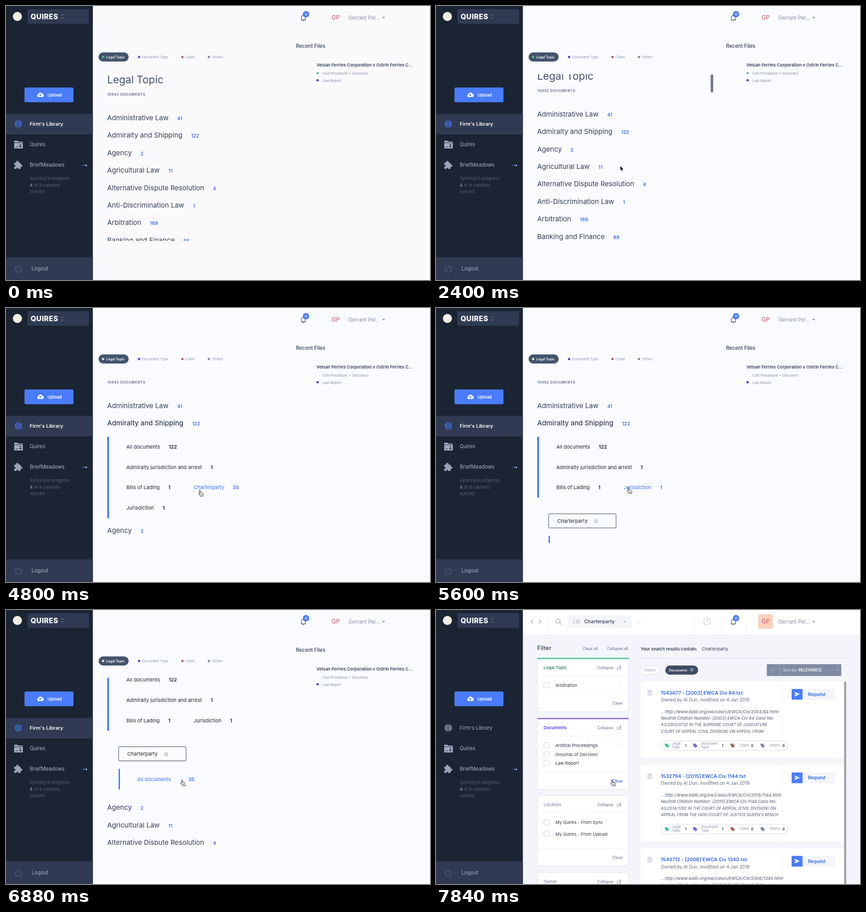
An HTML page for the animation above (8000 ms loop, 930x602 px).

```html
<!DOCTYPE html>
<html lang="en">
<head>
<meta charset="utf-8">
<title>Document library</title>
<style>
html, body { margin: 0; height: 100%; overflow: hidden; }
svg { display: block; width: 930px; height: 602px; font-family: Inter, sans-serif; white-space: pre; }
</style>
</head>
<body>
<svg id="stage" viewBox="0 0 930 602"></svg>
<script>
const LOOP = 8000, STEP = 160;
const BLUE = '#4a7cfb', LINK = '#3f70f5', NAVY = '#303a52', INK = '#333f55', GREY = '#868ea7',
  GREEN = '#45c48f', VIOLET = '#5340e0', RED = '#b0645f', SLATE = '#7f89a3', PAGE = '#f3f5fa';

const text = (x, y, s, size, fill, weight = 400, extra = '') =>
  `<text x="${x}" y="${y}" font-size="${size}" fill="${fill}" font-weight="${weight}" ${extra}>${s}</text>`;
const rect = (x, y, w, h, fill, r = 0, extra = '') =>
  `<rect x="${x}" y="${y}" width="${w}" height="${h}" fill="${fill}" rx="${r}" ${extra}/>`;
const dot = (x, y, r, fill) => `<circle cx="${x}" cy="${y}" r="${r}" fill="${fill}"/>`;
const path = (d, fill) => `<path d="${d}" fill="${fill}"/>`;
const stroke = (d, color, w = 1) => `<path d="${d}" fill="none" stroke="${color}" stroke-width="${w}"/>`;
const count = (n, size, fill, dx = 19) =>
  `<tspan dx="${dx}" font-size="${size}" font-weight="600" fill="${fill}">${n}</tspan>`;

// Value of a keyed track [time, ...values] at time t
function track(keys, t) {
  const i = keys.findIndex(k => k[0] > t);
  if (i === 0) return keys[0].slice(1);
  if (i < 0) return keys[keys.length - 1].slice(1);
  const a = keys[i - 1], b = keys[i];
  let p = (t - a[0]) / (b[0] - a[0]);
  p = p * p * (3 - 2 * p);
  return a.slice(1).map((v, j) => v + (b[j + 1] - v) * p);
}

const POINTER = [[960, 470, 430], [1440, 404, 351], [2720, 404, 351], [3360, 365, 258],
  [4480, 365, 258], [4800, 425, 400], [5280, 422, 394], [6400, 422, 394], [6880, 386, 373]];
const SCROLL = [[2240, 0], [2720, 31.3], [5920, 31.3], [6240, 183]];

function sidebar(results) {
  const tone = results ? '#9aa3b9' : '#3f70e8';
  let s = rect(0, 0, 190.5, 602, '#1b2433') + dot(25, 23, 10, '#f1eee2') + rect(47, 7, 135, 32, NAVY, 2)
    + text(54, 28.5, 'QUIRES', 15.5, '#fff', 800, 'letter-spacing=".5"')
    + stroke('M121 21l2.5-2.5 2.5 2.5M121 25l2.5 2.5 2.5-2.5', '#8790a6')
    + rect(40.5, 179, 107.5, 32.5, BLUE, 3)
    + path('M71.5 200a3.3 3.3 0 0 1-.3-6.5a4.3 4.3 0 0 1 8.2-.8a3.6 3.6 0 0 1-.4 7.300z', '#fff')
    + path('M75 193l-2.7 3h1.7v2.2h2v-2.2h1.7z', BLUE)
    + text(91, 198.5, 'Upload', 9.2, '#fff', 600);
  if (!results) s += rect(0, 237, 190.5, 45, NAVY);
  s += dot(27, 259, 8, tone)
    + stroke('M19 259h16M20.5 255h13M20.5 263h13M27 251v16M27 251q-8 8 0 16M27 251q8 8 0 16', results ? '#1b2433' : NAVY, .9)
    + text(52, 262.5, 'Firm\'s Library', 11, results ? '#aab2c6' : '#fff', results ? 400 : 600)
    + path('M18 296h7l2 2h10v15h-19z', '#a3abc0') + stroke('M18 300.5h19', '#1b2433')
    + dot(31.5, 305, 1.5, '#1b2433') + rect(29, 308, 5, 2, '#1b2433') + rect(21, 309, 5, 1, '#1b2433')
    + text(52, 307.5, 'Quires', 11.1, '#aab2c6')
    + rect(18, 344, 14, 14, '#9aa3b8', 1.5) + dot(25, 343, 2.8, '#9aa3b8') + dot(33, 351, 2.8, '#9aa3b8')
    + dot(19, 351, 2, '#1b2433') + dot(25, 357.5, 2, '#1b2433')
    + text(52, 352.5, 'BriefMeadows', 11.2, '#aab2c6')
    + dot(167, 350, 1.2, '#3157ad') + dot(171.5, 350, 1.4, '#5d8bf5') + dot(176, 350, 1.5, '#fff')
    + text(52, 382, 'Syncing in progress', 9.35, '#59647a')
    + text(52, 396.5, '<tspan font-weight="700" fill="#7d879c">4</tspan> of 8 cabinets', 9.35, '#59647a')
    + text(52, 411, 'synced', 9.35, '#59647a')
    + rect(0, 552, 190.5, 50, NAVY) + stroke('M23.5 572a7 7 0 1 0 7 0M27 570v7', '#5c667d', 1.2)
    + text(56, 581, 'Logout', 11.1, '#a9b1c6');
  return s;
}

function header(panels, results, tag) {
  let s = '';
  if (panels || results) {
    const tone = results ? '#a9b0c2' : '#e9ecf4';
    s += rect(190, 0, 740, 53, '#fff') + stroke('M247.5 0v53M565.5 0v53M623.5 0v53M680.5 0v53', '#f0f2f7')
      + stroke('M212 21l-4 4.5 4 4.5M226 21l4 4.5-4 4.5', tone, 1.5)
      + stroke('M272 24a4.5 4.5 0 1 0-9 0a4.5 4.5 0 1 0 9 0M271 27.5l5 5', tone, 1.5)
      + stroke('M602 25.5a7.5 7.5 0 1 0-15 0a7.5 7.5 0 1 0 15 0', results ? '#c3c9d8' : '#eceef5', 1.2)
      + text(594.5, 29, '?', 9.5, results ? '#c3c9d8' : '#eceef5', 500, 'text-anchor="middle"')
      + rect(707, 9.5, 32, 32, results ? '#fbd0bd' : '#f3f2fa', 3);
    if (!tag) s += text(288, 29.5, 'Search anything in the firm ...', 11, '#eef0f6');
  }
  if (results) s += rect(288, 12, 142, 27, '#f3f5f9', 2) + text(440, 29, '...', 11, '#a5adbf');
  if (tag) s += text(300, 29, 'cat', 11, '#a5adbf') + text(325, 29, 'Charterparty', 10.9, INK, 500)
    + stroke('M411.5 23.5l4 4M415.5 23.5l-4 4', GREY);
  return s + stroke('M646.5 30.5h11.5M648 30v-4.5q0-4.5 4.2-4.5t4.2 4.5v4.5M651 32.5h2.5', '#566079', 1.3)
    + dot(658, 18, 7, BLUE) + text(658, 21, '0', 7.5, '#fff', 600, 'text-anchor="middle"')
    + text(714, 30, 'GP', 13.2, '#c0566c') + text(751, 29.5, 'Gerrant Pel...', 11.2, GREY)
    + path('M825 24h6.5l-3.2 3.5z', GREY);
}

const TABS = [['Document Type', 292, VIOLET, 283, 81], ['Client', 387, RED, 378, 44], ['Others', 445, SLATE, 436, 48]];
const TOPICS = [['Administrative Law', 41], ['Admiralty and Shipping', 122], ['Agency', 2], ['Agricultural Law', 11],
  ['Alternative Dispute Resolution', 4], ['Anti-Discrimination Law', 1], ['Arbitration', 169],
  ['Banking and Finance', 88], ['Civil Procedure Law', 97]];

function home(t, panels) {
  const scroll = track(SCROLL, t)[0], expanded = t >= 3680, opened = t >= 5440;
  const green = t < 4480 ? GREEN : '#e3eeea';
  let s = rect(203, 102, 66, 20, '#43546e', 10) + dot(213, 112, 2.5, green)
    + text(220, 114.5, 'Legal Topic', 7.3, '#fff', 600);
  for (const [label, x, color, left, w] of TABS) {
    if (panels) s += rect(left, 103, w, 18, '#fff', 9);
    s += dot(x, 112, 2.6, color) + text(x + 6.5, 114.5, label, 7.7, '#8f97ae');
  }

  if (panels) s += rect(636, 110, 284, 72, '#fff', 3) + path('M655 124h6l3 3v9h-9z', '#eceef5');
  s += text(636, 92, 'Recent Files', 11.1, INK, 500)
    + text(681, 133, 'Velsan Ferries Corporation v Ostrin Ferries C...', 9.4, INK, 600)
    + path('M683.5 144.5l3 3-3 3-3-3z', t < 4480 ? GREEN : panels ? '#eceef2' : 'none')
    + text(694, 150.5, 'Civil Procedure &gt; Discovery', 7.7, GREY)
    + dot(683.5, 163, 2.6, VIOLET) + text(694, 166.5, 'Law Report', 7.7, GREY);

  let list = text(222, 170, 'Legal Topic', 22.7, '#43506a')
    + text(222, 197, '10992 DOCUMENTS', 7.4, '#69748d', 700, 'letter-spacing=".75"');
  TOPICS.forEach(([name, n], i) => {
    const shift = i < 2 ? 0 : opened ? 294.5 : expanded ? 197.5 : 0;
    list += text(222, 251 + 38.4 * i + shift, name + count(n, 10.6, LINK), 15, INK, expanded && i === 1 ? 500 : 400);
  });
  const item = (x, y, name, n, w, hover, dx = 19) => {
    if (panels) list += rect(x - 19, y - 16, w, 32, '#fff', 3);
    list += text(x, y + 4, name + count(n, 10.8, hover ? LINK : '#161a26', dx), 11, hover ? LINK : '#20242f');
  };
  if (expanded) {
    list += rect(222, 314, 4, opened ? 134 : 179, BLUE);
    item(264, 336, 'All documents', 122, 151);
    item(264, 381, 'Admiralty jurisdiction and arrest', 1, 230);
    item(264, 425.7, 'Bills of Lading', 1, 135);
    if (opened) {
      item(412, 425.7, 'Jurisdiction', 1, 125, t < 6400);
      list += rect(247, 483.5, 148, 31, panels ? '#fff' : 'none', 2, `stroke="${INK}"`)
        + text(266, 503, 'Charterparty', 11, '#20242f')
        + stroke('M355 500a3.7 3.7 0 1 0-7.4 0a3.7 3.7 0 1 0 7.4 0', GREY) + dot(351.3, 500, 1.1, GREY)
        + rect(247, 532, 3, 45, BLUE);
      item(288, 554.5, 'All documents', 35, 185, t >= 6720, 38);
    } else {
      item(412, 425.7, 'Charterparty', 35, 139, t >= 4800);
      item(264, 470.5, 'Jurisdiction', 1, 125);
    }
  }
  s += `<g clip-path="url(#list)"><g transform="translate(0 ${-scroll})">${list}</g></g>`;
  if ((t > 2240 && t < 2880) || (t > 5920 && t < 6560)) s += rect(602.5, 149 + scroll * .126, 5.5, 40, '#70748c', 2.7);
  return s;
}

function filterPanel(y, h, title, color, bar, items, hover) {
  const box = (x, y) => rect(x, y, 12, 12, '#fff', 1, 'stroke="#ccd2df"');
  let s = rect(222.5, y, 200, h, '#fff', 3, 'stroke="#dce0ea"');
  if (bar) s += rect(222, y - 1.5, 201, 3, bar, 1.5);
  s += text(236, y + 23.5, title, 9.2, color, 600) + text(354, y + 23, 'Collapse', 8.4, GREY, 600)
    + stroke(`M396 ${y + 23.5}h9.500M397.5 ${y + 21.5}v-4M400.5 ${y + 21.5}v-2.500M403.5 ${y + 21.5}v-5M404.5 ${y + 15}v8`, GREY)
    + stroke(`M223 ${y + 38.5}h199M223 ${y + h - 38.5}h199`, '#eceff5');
  items.forEach(([label, cy]) => s += box(236.5, cy - 6) + text(262, cy + 3.5, label, 9.6, '#2c3446'));
  if (bar) s += stroke(`M403 ${items[0][1] - 1.5}l3 3 3-3`, '#bcc3d3');
  return s + text(387, y + h - 15.5, 'Clear', 8.9, hover ? LINK : GREY, 600);
}

const FILES = [
  ['1543677', 2003, 84, 'A3/2002/0722 IN THE SUPREME COURT OF JUDICATURE', 'COURT OF APPEAL (CIVIL DIVISION) ON APPEAL FROM'],
  ['1532794', 2015, 1144, 'A3/2014/1282 IN THE COURT OF APPEAL (CIVIL DIVISION) ON', 'APPEAL FROM THE HIGH COURT OF JUSTICE QUEEN\'S BENCH'],
  ['1543712', 2006, 1340, '', '']];

function card([id, year, no, line3, line4], i) {
  const tag = (x, color) => path(`M${x} 293.5h4.5l5 5-4 4.5-5.5-5z`, color);
  const lines = [`...http://www.bailii.org/ew/cases/EWCA/Civ/${year}/${no}.html`,
    `Neutral Citation Number: [${year}] EWCA Civ ${no} Case No:`, line3, line4];
  let s = rect(449, 157, 446, 168, '#fff', 2) + stroke('M760.5 157v168', PAGE)
    + path('M464 175h7l3 3v10h-10z', '#d6dae7') + stroke('M466 182h6M466 185h6', '#fff')
    + text(493, 185.5, `${id} - [${year}] EWCA Civ ${no}.txt`, 10.75, '#2f63e0', 600)
    + text(493, 201, 'Owned by Al Dun, modified on 4 Jan 2019', 9.8, '#636b80');
  lines.forEach((line, j) => s += text(493.5, 226.5 + 14.4 * j, line, j < 2 ? 9.25 : 8.45, '#656d81', 500, 'font-style="italic"'));
  s += rect(494, 287.5, 278, 21, '#fff', 10.5, 'stroke="#d3d8e4"')
    + tag(502, GREEN) + tag(564, '#8a5be6') + tag(646, RED) + tag(712, SLATE);
  for (const [x, y, label] of [[517, 296, 'Legal'], [517, 304, 'Topic'], [581, 296, 'Document'], [581, 304, 'Type'],
    [666, 300, 'Client'], [731, 300, 'Others']]) s += text(x, y, label, 7.6, GREY);
  for (const [x, n] of [[546, 1], [627, 1], [691, 0], [760, 0]]) s += text(x, 300.5, n, 7.6, '#20242f', 600);
  s += rect(780, 173.5, 96, 23.5, PAGE, 2) + rect(780, 173.5, 24, 23.5, BLUE, 2)
    + path('M787 180l11 5-11 5v-4l6-1-6-1z', '#fff') + text(816, 189, 'Request', 9.8, '#2f63e0', 600);
  return `<g transform="translate(0 ${183.4 * i})">${s}</g>`;
}

function searchResults() {
  return text(222, 88, 'Filter', 12.8, INK, 500) + text(322, 88, 'Clear all', 8.4, GREY, 600) + text(375, 88, 'Collapse all', 8.4, GREY, 600)
    + filterPanel(106.5, 117, 'Legal Topic', '#3d7f6c', '#5cc69a', [['Arbitration', 165]])
    + filterPanel(238.5, 156, 'Documents', '#5a3be0', '#9276dc', [['Arbitral Proceedings', 297], ['Grounds of Decision', 317], ['Law Report', 336.5]], true)
    + filterPanel(407.5, 155, 'Location', '#8f97ac', '', [['My Quires - From Sync', 466.5], ['My Quires - From Upload', 492]])
    + filterPanel(576.5, 120, 'Owner', '#8f97ac', '', [])
    + text(449, 89, 'Your search results contain:', 9.2, INK, 600) + text(583, 89, 'Charterparty', 9.6, INK)
    + stroke('M449 106h452', '#dcdfe8')
    + rect(449.5, 122.5, 41, 19, '#fff', 9.5, 'stroke="#d9dde7"') + text(456, 135, 'Folders', 7.4, GREY)
    + rect(503, 122, 72, 20, '#3f4d69', 10) + text(511, 135, 'Documents' + count(17, 7.4, '#fff', 6), 7.3, '#fff', 600)
    + rect(725.5, 119, 163.5, 26, '#808ba3', 2)
    + stroke('M754.5 119v26M734 128.5h14M734 132.5h10M734 136.5h6', '#a3acc0')
    + text(761, 135, 'Sort by: <tspan font-weight="600" fill="#fff">RELEVANCE</tspan>', 8.6, '#e8ebf2')
    + path('M878 131h5l-2.5 2.5z', '#b9c0cf')
    + FILES.map(card).join('') + rect(895, 157, 5, 460, '#a5a7ab', 2.5);
}

function pointer(t) {
  if (t < 960) return '';
  const [x, y] = track(POINTER, t);
  const hand = (t >= 3200 && t < 4640) || (t >= 4800 && t < 5920) || t >= 6720;
  const shape = hand
    ? '<path d="M-1.2 1.2a1.2 1.2 0 0 1 2.4 0v4l1.8.2.3.6 1.8.2.3.6 1.5.3c.8.3 1 1 .9 2l-.8 4.5h-5.7l-4-5c-.6-1 .6-1.8 1.6-.9l.9.8zM2.3 9v2.5M4.3 9v2.5" fill="#fff" stroke="#222838"/>'
    : '<path d="M0 0v11l2.5-2.3 1.8 4 1.8-.8-1.8-3.9h3.6z" fill="#111" stroke="#fff" stroke-width=".6"/>';
  return `<g transform="translate(${x} ${y})">${shape}</g>`;
}

function scene(t) {
  const results = t >= 7680, panels = t >= 6080 && t < 6560, tag = t >= 7200;
  const page = results || panels ? PAGE : t < 2240 ? '#fafafd' : '#f9fbfe';
  let s = '<clipPath id="list"><path d="M190 149.5h440v366.5h-440z"/></clipPath>' + rect(0, 0, 930, 602, page)
    + (results ? searchResults() : home(t, panels)) + header(panels, results, tag) + sidebar(results);
  if (t >= 7360 && !results) s += rect(-3, 587.5, 311.5, 20, '#fff', 3, 'stroke="#b9bcc2"')
    + text(1, 598.5, 'Waiting for meraxes.api.intelllex.com...', 9.2, '#444', 400, 'font-family="Roboto, sans-serif"');
  return s + pointer(t);
}

const stage = document.getElementById('stage');
let shown = -1;
function tick() {
  const t = Math.floor(performance.now() % LOOP / STEP) * STEP;
  if (t !== shown) stage.innerHTML = scene(shown = t);
  requestAnimationFrame(tick);
}
tick();
</script>
</body>
</html>
```
